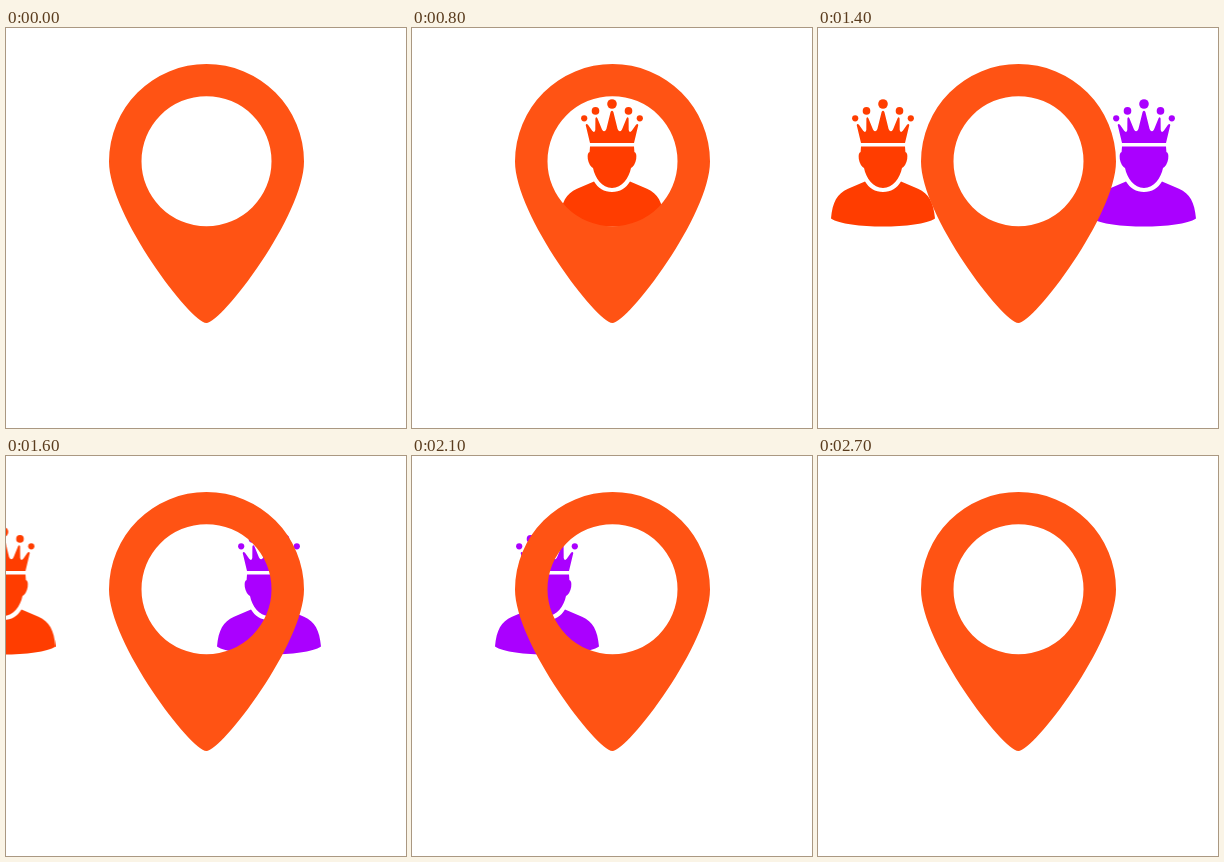
An HTML page that plays this animation: 400 px wide and 400 px high, repeating every 2800 ms.

```html
<!DOCTYPE html>
<html lang="en">
<head>
<meta charset="utf-8">
<title>Kings and pin</title>
<style>
  html, body { margin: 0; width: 100%; height: 100%; overflow: hidden; background: #fff; }
  svg { display: block; width: 100%; height: 100%; }
  #red { fill: #ff3d00; }
  #purple { fill: #aa00ff; }
  #pin { fill: #ff5314; fill-rule: evenodd; }
</style>
</head>
<body>
<svg viewBox="0 0 400 400">
  <defs>
    <g id="king">
      <circle cy="76" r="4.8"/>
      <circle cx="-16.5" cy="82.9" r="3.8"/>
      <circle cx="16.5" cy="82.9" r="3.8"/>
      <circle cx="-27.8" cy="90.3" r="3.1"/>
      <circle cx="27.8" cy="90.3" r="3.1"/>
      <!-- crown -->
      <path d="M-22 115 L-26.3 97 Q-25.6 95 -24 96.8 L-19.8 102.8
        Q-17.6 105.4 -16.7 102 L-16.6 90.5 Q-15.8 88.2 -14.6 90.2 L-10 101.4
        Q-7.6 105.4 -5.6 101 L-1.4 84 Q0 81.4 1.4 84 L5.6 101
        Q7.6 105.4 10 101.4 L14.6 90.2 Q15.8 88.2 16.6 90.5 L16.7 102
        Q17.6 105.4 19.8 102.8 L24 96.8 Q25.6 95 26.3 97 L22 115 Z"/>
      <!-- head -->
      <path d="M-22 118.5 H22 L22.4 124 Q25 125 24.2 131 Q23 137.5 19 140
        C17 150 10 160 0 160 C-10 160 -17 150 -19 140
        Q-23 137.5 -24.2 131 Q-25 125 -22.4 124 Z"/>
      <!-- shoulders -->
      <path d="M-18 153.5 C-14 160 -8 164 0 164 C8 164 14 160 18 153.5
        L35 160.8 C46 166 50.5 174 52 190.5 C44 196 22 198.5 0 198.5
        C-22 198.5 -44 196 -52 190.5 C-50.5 174 -46 166 -35 160.8 Z"/>
    </g>
  </defs>
  <use id="red" href="#king"/>
  <use id="purple" href="#king"/>
  <path id="pin" d="M103 133.5 A97.5 97.5 0 0 1 298 133.5
    C298 187 216 295 200.5 295 C185 295 103 187 103 133.5 Z
    M135.5 133.2 a65 65 0 1 0 130 0 a65 65 0 1 0 -130 0 Z"/>
</svg>
<script>
  const LOOP = 2800, TICK = 100;

  // [time in ms, x of the figure's centre]
  const tracks = {
    red: [[0, 452], [800, 200], [1000, 200], [1800, -70], [LOOP, -70]],
    purple: [[0, 452], [1000, 452], [1800, 200], [1900, 200], [2700, -60], [LOOP, -60]]
  };

  for (const [id, track] of Object.entries(tracks)) {
    const frames = track.map(([time, x], i) => {
      const next = track[i + 1];
      return {
        offset: time / LOOP,
        transform: `translateX(${x}px)`,
        easing: next ? `steps(${(next[0] - time) / TICK}, end)` : "linear"
      };
    });
    document.getElementById(id).animate(frames, { duration: LOOP, iterations: Infinity });
  }
</script>
</body>
</html>
```
